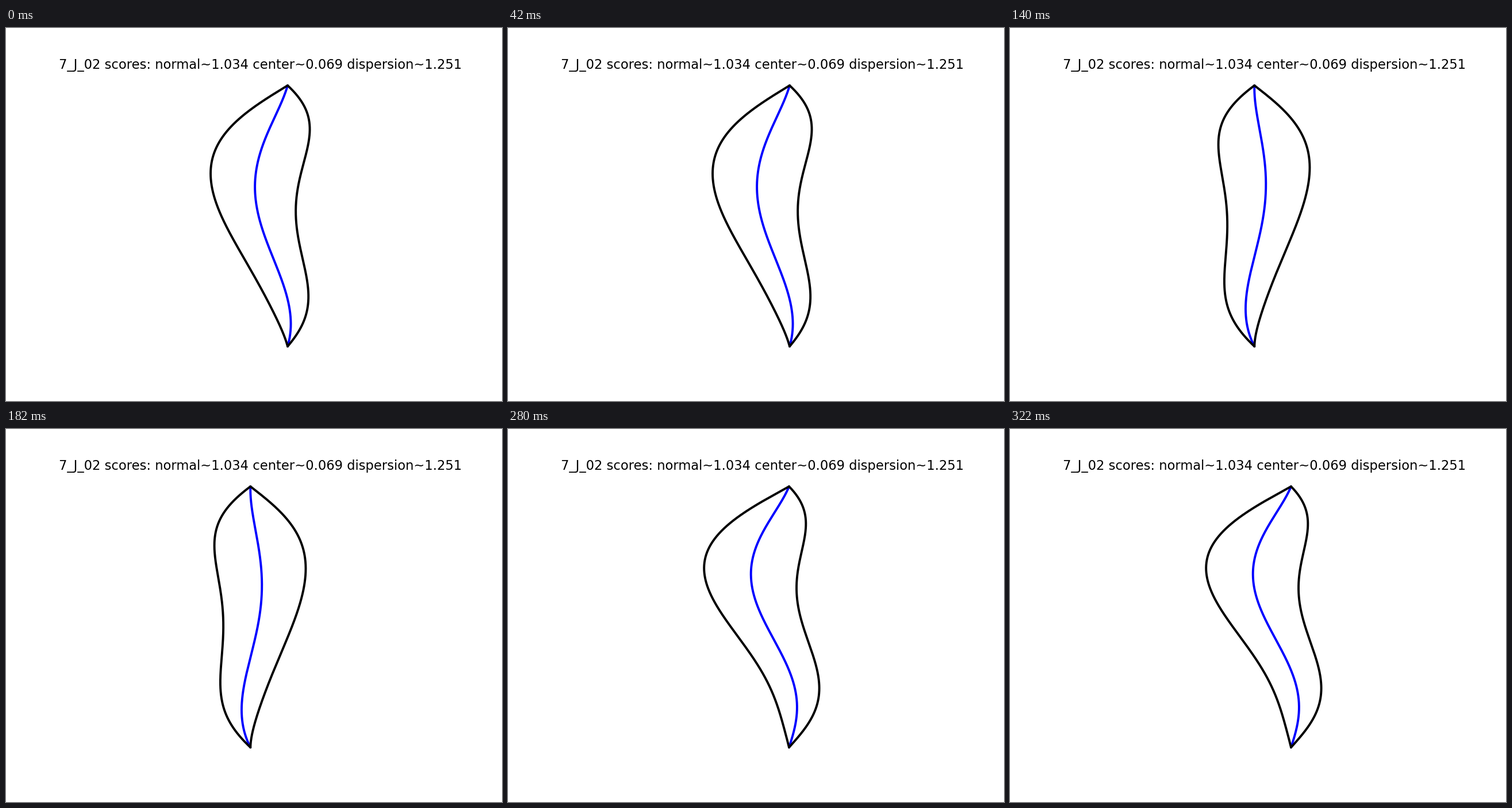
Recreate the animation shown at these times as a matplotlib script. Size 863 px wide and 649 px high, loop 0.35 s.

```python
import numpy as np
import matplotlib.pyplot as plt
from matplotlib.animation import FuncAnimation

W, H, DPI = 863, 649, 64
PT = 72 / DPI  # points per pixel
TOP, BOTTOM = 100, 554
TITLE = "7_J_02 scores: normal~1.034 center~0.069 dispersion~1.251"

# key points from tip to tip, spaced as cosine nodes
HALF_WIDTH = [0, 21.2, 62.9, 76.4, 62, 46.5, 30, 9.1, 0]
POSES = [
    [490, 478.8, 443.5, 439.5, 480.4, 495.3, 490],
    [459, 457.3, 444.3, 425.8, 425.9, 448.5, 459],
    [425.3, 426.8, 440.6, 440.8, 415.3, 413.9, 425.3],
    [448.8, 445, 435.3, 460.8, 466.6, 444.5, 448.8],
    [489, 473, 428.8, 442.2, 496.3, 497.9, 489],
]


def smooth(points, u):
    """Polynomial through points at cosine-spaced nodes of [-1, 1]."""
    n = len(points) - 1
    nodes = -np.cos(np.pi * np.arange(n + 1) / n)
    return np.polyval(np.polyfit(nodes, points, n), u)


fig = plt.figure(figsize=(W / DPI, H / DPI), dpi=DPI, facecolor="white")
ax = fig.add_axes([0, 0, 1, 1])
ax.set_xlim(0, W)
ax.set_ylim(H, 0)
ax.axis("off")
ax.text(442.3, 71, TITLE, fontsize=22.6 * PT, family="DejaVu Sans",
        ha="center", va="baseline", color="black")

u = np.linspace(-1, 1, 300)
y = TOP + (BOTTOM - TOP) * (u + 1) / 2
half = smooth(HALF_WIDTH, u)
style = dict(lw=3.9 * PT, solid_capstyle="round", solid_joinstyle="round")
midline, left, right = (ax.plot([], [], color=c, **style)[0]
                        for c in ("blue", "black", "black"))


def draw(i):
    mid = smooth(POSES[i], u)
    # the shape widens as its midline bends
    length = np.hypot(np.diff(mid), np.diff(y)).sum()
    spread = half * length / (BOTTOM - TOP)
    for line, side in ((midline, 0), (left, -1), (right, 1)):
        line.set_data(mid + side * spread, y)
    return midline, left, right


anim = FuncAnimation(fig, draw, frames=len(POSES), interval=70,
                     repeat=True, repeat_delay=0)
plt.show()
```
